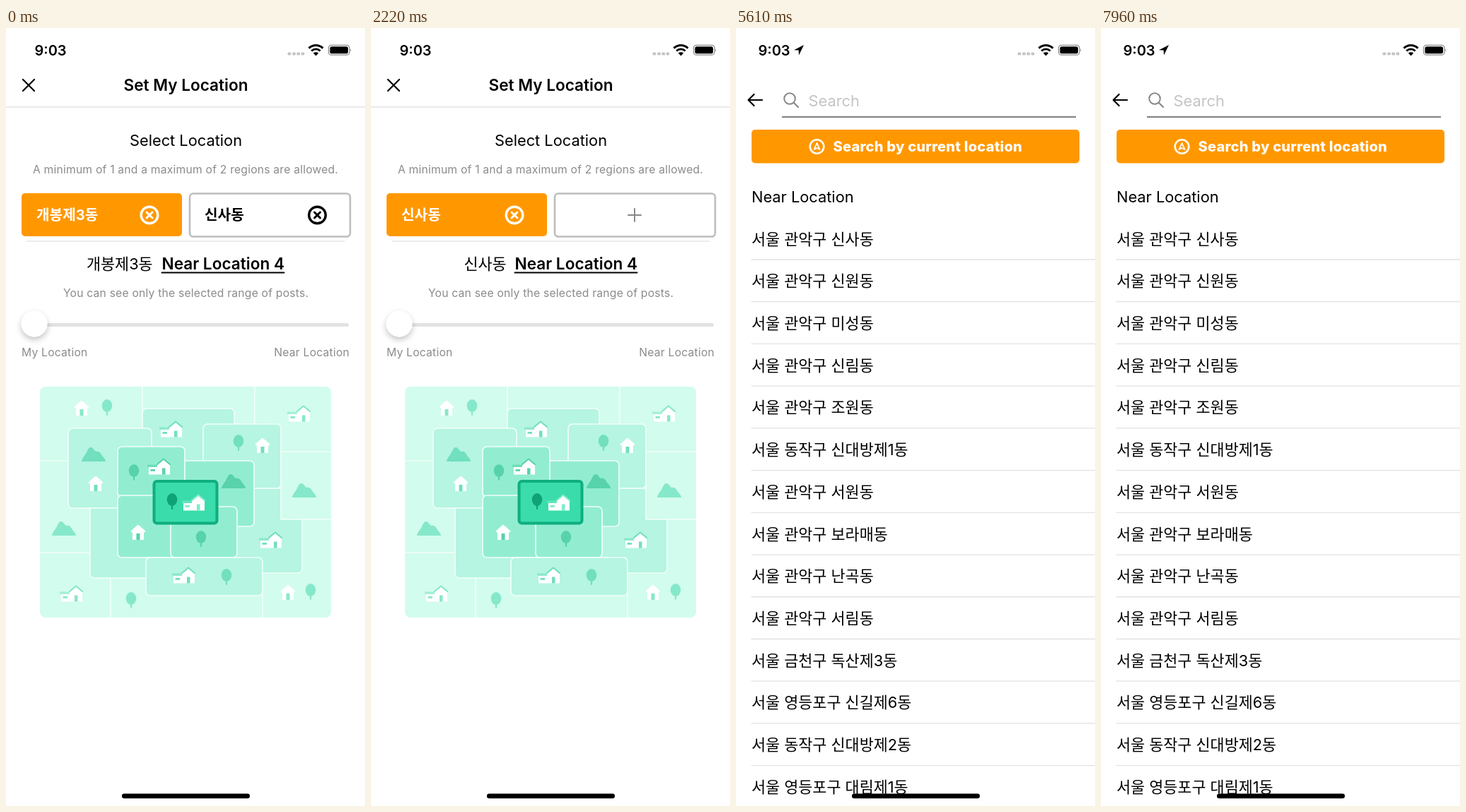
Write an HTML page that moves like this. It is 508x1102 px and loops after 8 s.

```html
<!DOCTYPE html>
<html lang="en">
<head>
<meta charset="utf-8">
<title>Set My Location</title>
<style>
  html, body { margin: 0; width: 100%; height: 100%; overflow: hidden; background: #fff; }
  svg { display: block; width: 508px; height: 1102px; }
  text { font-family: Inter, "Noto Sans CJK KR", "Noto Sans CJK", sans-serif; white-space: pre; }
  .mid { text-anchor: middle; }
  .end { text-anchor: end; }
  .title { font-size: 22.6px; font-weight: 600; }
  .body { font-size: 21.8px; }
  .note { font-size: 15.7px; letter-spacing: .2px; fill: #8b8b8b; }
  .chip { font-size: 20.2px; font-weight: 700; }
  .ask { font-size: 21.5px; font-weight: 600; }
  .link { font-size: 21.6px; fill: #0a7aff; }
  .time { font-size: 20px; font-weight: 600; }
  .find { font-size: 20.1px; font-weight: 800; letter-spacing: .2px; fill: #fff; }
  .line { fill: none; stroke-linecap: round; stroke-linejoin: round; }
</style>
</head>
<body>
<svg id="stage" viewBox="0 0 508 1102"></svg>
<script>
const LOOP = 8000, W = 508;

const text = (x, y, cls, str, more = '') => `<text x="${x}" y="${y}" class="${cls}" ${more}>${str}</text>`;
const rect = (x, y, x2, y2, r, more) =>
  `<rect x="${x}" y="${y}" width="${x2 - x}" height="${y2 - y}" rx="${r}" ${more}/>`;
const line = (d, color, width, more = '') =>
  `<path class="line" d="${d}" stroke="${color}" stroke-width="${width}" ${more}/>`;
const group = (id, inner, more = '') => `<g id="${id}" ${more}>${inner}</g>`;
const at = (x, y, inner) => `<g transform="translate(${x} ${y})">${inner}</g>`;

// Map illustration
const OUTER = '#d2fced', MID = '#b5f5e2', INNER = '#92edd0';
const tints = ['#86e8ca', '#72dfbe', '#58d2aa', '#0fa277'];
const trims = ['#86e8ca', '#72dfbe', '#58d2aa', '#7fecc9'];

const block = (x, y, x2, y2, fill, r = 6) => rect(x, y, x2, y2, r, `fill="${fill}" stroke="#f2fffa" stroke-width="1.6"`);
const tree = (x, y, k) => at(x, y, `<ellipse cy="-2" rx="7.3" ry="9" fill="${tints[k]}"/>` +
  line('M0 0V11', tints[k], 2.2));
const hill = (x, y, k) => at(x, y,
  `<path d="M-17 10C-17 7-13 2-11-1C-8-7-7-10-4-10C0-10 1-4 4-4C6-5 9-4 11 0C13 4 17 6 17 10Z" fill="${tints[k]}"/>`);
const hut = (x, y, k) => at(x, y,
  `<path d="M-8 11V-2L0-9L8-2V11Z" fill="#fff"/>` + line('M-9 -1L0 -9L9 -1', '#fff', 2.6) +
  rect(-2.5, 2, 2.5, 11, 0, `fill="${tints[k]}"`));
const house = (x, y, k) => at(x, y,
  `<path d="M-14 11.5V1H-2V-2L7-9.5L16-2V11.5Z" fill="#fff"/>` +
  line('M-2 -3L7 -10.5L16 -3', trims[k], 2.2) +
  rect(-16, -2.5, -2, 0.8, 0, `fill="${trims[k]}" opacity=".6"`) +
  rect(-11.5, 4, -5, 6.8, 0, `fill="${trims[k]}"`) + rect(5, 2.5, 9.5, 11.5, 0, `fill="${trims[k]}"`));

const town = rect(48, 508, 460, 835, 8, `fill="${OUTER}"`) +
  line('M193 508V570M352 508V564M48 613H90M48 743H120M148 778V835M363 800V835', '#f2fffa', 1.6) +
  block(119, 650, 240, 779, MID) + block(193, 539, 323, 640, MID) + block(300, 652, 419, 772, MID) +
  block(279, 561, 389, 652, MID) + rect(389, 600, 460, 696, 0, `fill="${OUTER}"`) +
  line('M460 600H389V696H460', '#f2fffa', 1.6) + block(88, 567, 206, 680, MID) +
  block(240, 613, 351, 706, INNER) + block(158, 593, 253, 664, INNER) +
  block(158, 662, 240, 750, INNER) + block(233, 678, 327, 750, INNER) + block(198, 750, 363, 804, MID) +
  rect(209.5, 642, 298.5, 701.5, 4, 'fill="#3adcab" stroke="#0fae80" stroke-width="4"') +
  hut(107, 538, 0) + hut(127, 645, 1) + hut(363, 591, 1) + hut(187, 714, 2) + hut(399, 799, 0) +
  house(414, 546, 0) + house(233, 568, 1) + house(216, 621, 2) + house(265, 672, 3) +
  house(374, 725, 1) + house(251, 775, 1) + house(92, 801, 0) +
  tree(143, 537, 0) + tree(329, 587, 1) + tree(181, 629, 2) + tree(235, 670, 3) +
  tree(276, 723, 2) + tree(312, 777, 1) + tree(177, 810, 0) + tree(431, 798, 0) +
  hill(124, 604, 1) + hill(322, 642, 2) + hill(82, 709, 0) + hill(422, 655, 0);

// Location screen
const closer = (x, color, id = '') => `<g ${id && `id="${id}"`}>` +
  `<circle cx="${x}" cy="265" r="11.8" fill="none" stroke="${color}" stroke-width="3.4"/>` +
  line(`M${x - 4} 261l8 8m0 -8l-8 8`, color, 3) + '</g>';
const heading = (name, x, x2) => text(x, 342, 'body', name) + text(x2, 342, 'title', 'Near Location 4') +
  line(`M${x2} 346.5h173`, '#000', 2);
const outline = rect(260, 234.5, 487, 295.5, 5, 'fill="#fff" stroke="#bdbdbd" stroke-width="2.6"');

const home = rect(0, 0, W, 1102, 0, 'fill="#fff"') +
  line('M24 73l16 16m0 -16l-16 16', '#000', 2.2) +
  text(254.5, 89, 'title mid', 'Set My Location') + line('M0 112H508', '#e3e3e3', 1.5) +
  text(254.5, 167, 'body mid', 'Select Location') +
  text(254, 206, 'note mid', 'A minimum of 1 and a maximum of 2 regions are allowed.') +
  rect(22, 234, 249, 295, 5, 'fill="#ff9800"') +
  group('two', text(43, 272, 'chip', '개봉제3동', 'fill="#fff"') + outline +
    text(281, 272, 'chip', '신사동') + closer(440.5, '#000') + heading('개봉제3동', 114, 220.5)) +
  group('one', text(43, 272, 'chip', '신사동', 'fill="#fff"') +
    group('add', outline + line('M364 265h18m-9 -9v18', '#888', 2)) + heading('신사동', 131.5, 203.5)) +
  closer(203, '#e88f10', 'held') + closer(203, '#fff', 'close') +
  line('M30 302H479', '#e6e6e6', 1.3) +
  text(254.5, 381, 'note mid', 'You can see only the selected range of posts.') +
  rect(22, 418, 485, 423, 2.5, 'fill="#e2e2e2"') +
  '<circle cx="40" cy="419" r="18.5" fill="#fff" filter="url(#soft)"/>' +
  text(22, 465, 'note', 'My Location') + text(486, 465, 'note end', 'Near Location') + town;

// Search screen
const areas = ['관악구 신사동', '관악구 신원동', '관악구 미성동', '관악구 신림동', '관악구 조원동',
  '동작구 신대방제1동', '관악구 서원동', '관악구 보라매동', '관악구 난곡동', '관악구 서림동',
  '금천구 독산제3동', '영등포구 신길제6동', '동작구 신대방제2동', '영등포구 대림제1동'];
const rows = areas.map((name, i) => {
  const y = i * 59.72;
  return text(22, 306.5 + y, 'body', '서울 ' + name) + line(`M22 ${328 + y}H508`, '#e2e2e2', 1.3);
}).join('');

const search = rect(-9, 0, 0, 1102, 0, 'id="shadow" fill="url(#edge)"') + rect(0, 0, W, 1102, 0, 'fill="#fff"') +
  line('M37 102H17.5m8 -8l-8 8l8 8', '#000', 2.2, 'id="back"') +
  '<circle cx="76" cy="100" r="7.8" fill="none" stroke="#888" stroke-width="2"/>' +
  line('M82 106l6 6', '#888', 2.2) + text(102.5, 111, 'body', 'Search', 'fill="#c4c4c4"') +
  rect(65, 124.8, 481, 127.2, 0, 'fill="#888"') + rect(22, 144, 486, 191.5, 5, 'fill="#ff9800"') +
  '<circle cx="114.5" cy="168" r="9.8" fill="none" stroke="#fff" stroke-width="2.6"/>' +
  line('M110.5 172l4 -9l4 9l-4 -2z', '#fff', 1.8) +
  text(137.5, 175.2, 'find', 'Search by current location') +
  text(22, 246.5, 'body', 'Near Location') + rows;

// Status bar
const wifi = [10, 6.2].map(r => {
  const y = 38.8 - r * 1.02, arc = r * 1.42;
  return line(`M${438.5 - r} ${y}A${arc} ${arc} 0 0 1 ${438.5 + r} ${y}`, '#000', 2.9, 'style="stroke-linecap:butt"');
}).join('') + '<path d="M438.5 39.4L434.8 35.6A5.4 5.4 0 0 1 442.2 35.6Z"/>';
const bars = [401, 407.6, 413.8, 420].map(x => rect(x - 2.4, 34.4, x + 2.2, 38.6, 1.4, 'fill="#c4c4c4"')).join('');
const status = group('clock', text(0, 38.5, 'time', '9:03')) +
  '<path id="fix" d="M82 31.2L96 24L89 38.4L88.6 31.6Z"/>' + bars + wifi +
  rect(456.5, 24.3, 486, 38.2, 4, 'fill="none" stroke="#8c8c8c" stroke-width="1.3"') +
  rect(458.4, 26.2, 484, 36.3, 2.6, '') + '<path d="M487.3 29.2Q489.4 31.2 487.3 33.4Z" fill="#8c8c8c"/>';

// Alerts
const alertBox = (id, y, y2, lines, yes) => {
  const bar = y2 - 59.5;
  return group(id, rect(71.5, y, 437, y2, 19, 'fill="url(#glass)" opacity=".96"') +
    group(id + 'Press', `<path d="M254.5 ${bar}H437V${y2 - 19}Q437 ${y2} 418 ${y2}H254.5Z" fill="#000" opacity=".07"/>`) +
    lines.map((s, i) => text(254.5, y + 48 + i * 29.9, 'ask mid', s)).join('') +
    line(`M72 ${bar}H437M254.5 ${bar}V${y2}`, '#bcc9c4', 1.2) +
    text(163, y2 - 20.5, 'link mid', 'Cancel', 'font-weight="600"') + text(346, y2 - 20.5, 'link mid', yes));
};

document.getElementById('stage').innerHTML = `<defs>
  <linearGradient id="glass" x2="0" y2="1"><stop stop-color="#e0efe9"/><stop offset=".5" stop-color="#e8f2ef"/>
    <stop offset="1" stop-color="#def0e9"/></linearGradient>
  <linearGradient id="edge"><stop stop-opacity="0"/><stop offset="1" stop-opacity=".12"/></linearGradient>
  <filter id="soft" x="-50%" y="-50%" width="200%" height="200%">
    <feDropShadow dx="0" dy="4" stdDeviation="4.5" flood-opacity=".24"/></filter></defs>` +
  group('home', home) + group('search', search) + group('status', status) +
  rect(0, 0, W, 1102, 0, 'id="dim" fill="#08140e"') +
  alertBox('drop', 473, 643.5, ['Are you sure you want to', 'delete the selected region?'], 'Conform') +
  alertBox('swap', 428, 688, ['If only one location is', 'selected, it cannot be',
    'deleted. Would you like to', 'change the currently set', 'location?'], 'Change') +
  rect(164, 1084.6, 345, 1091.2, 3.3, '');

// Motion: every transition is a critically damped spring
const el = id => document.getElementById(id);
const show = (id, on) => el(id).style.display = on ? '' : 'none';
const fade = (id, v) => { el(id).style.opacity = v; show(id, v > 0); };
const move = (id, x) => el(id).setAttribute('transform', `translate(${x} 0)`);

const rise = (t, start) => {
  if (t <= start) return 0;
  const k = (t - start) * 0.01826, left = (1 + k) * Math.exp(-k);
  return left < 0.0008 ? 1 : 1 - left;
};
const press = (t, down, up) =>
  t < down ? 1 : t < up ? 0.2 : Math.min(1, 0.2 + 0.8 * (t - up) / 250);

const alerts = [
  { id: 'drop', open: 1190, tap: 1700, shut: 1875 },
  { id: 'swap', open: 3830, tap: 4340, shut: 4440 }
];

function draw(t) {
  let dim = 0;
  for (const a of alerts) {
    const come = rise(t, a.open), v = come * (1 - rise(t, a.shut)), s = 1.2 - 0.2 * come;
    const shown = v < 0.02 ? 0 : v;
    fade(a.id, shown);
    el(a.id).setAttribute('transform', `translate(254.25 558) scale(${s}) translate(-254.25 -558)`);
    show(a.id + 'Press', t >= a.tap && t < a.shut);
    dim += shown;
  }
  fade('dim', dim * 0.2);

  const single = t >= 2190;
  show('two', !single);
  show('one', single);
  const lit = t < 2500 ? press(t, 1070, 1200) : press(t, 3710, 3840);
  fade('close', (lit - 0.2) / 0.8);
  fade('held', (1 - lit) / 0.8);
  fade('add', press(t, 6940, 7190));
  fade('back', t < 6900 ? press(t, 6010, 6190) : 1);

  const page = rise(t, 5045) - rise(t, 6170) + rise(t, 7190);
  move('home', -0.3 * W * page);
  move('search', W * (1 - page));
  show('search', page > 0.0005);
  fade('shadow', page);

  const located = t >= 5200;
  move('clock', located ? 31.5 : 40.5);
  show('fix', located);
}

function tick() {
  draw(performance.now() % LOOP);
  requestAnimationFrame(tick);
}
tick();
</script>
</body>
</html>
```
